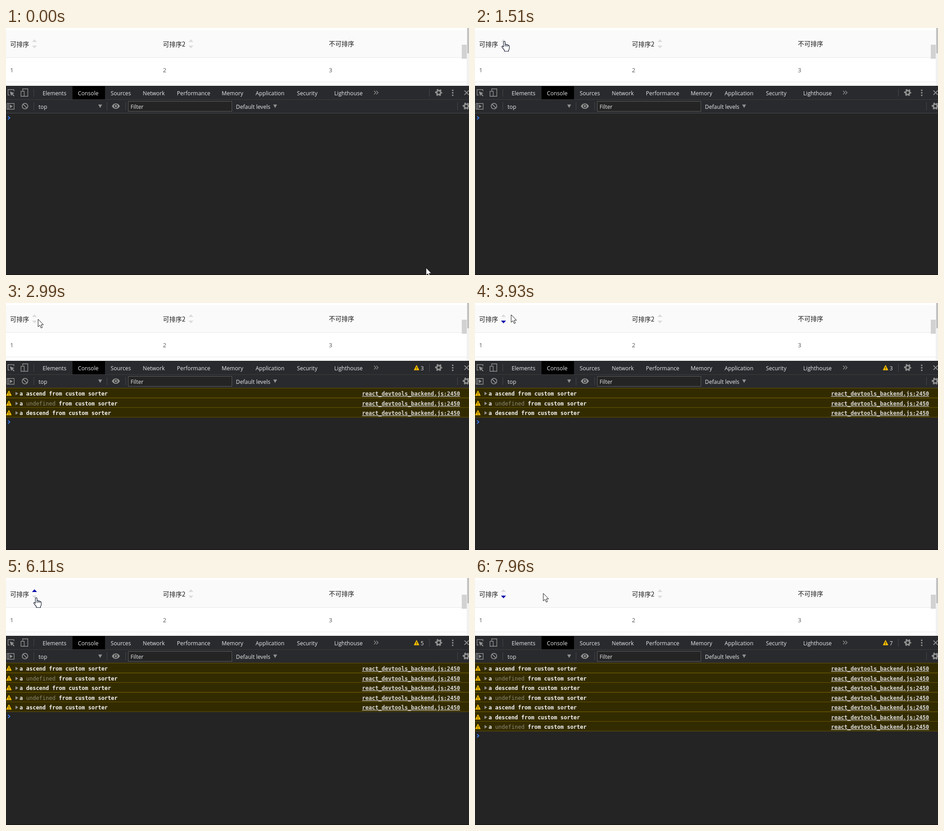
Recreate the animation shown at these times as an HTML page. Size 1024 by 547 pixels, loop 8000 ms.

```html
<!DOCTYPE html>
<html lang="zh">
<head>
<meta charset="utf-8">
<title>Sortable table with console</title>
<style>
html, body { margin: 0; width: 100%; height: 100%; overflow: hidden; background: #242424; }
svg { display: block; width: 100vw; height: 100vh; }
text { white-space: pre; }
.table { font: 14px "Noto Sans CJK SC", "Noto Sans CJK", sans-serif; fill: #1f1f1f; }
.cell { font: 13.2px "Open Sans", sans-serif; fill: #555; }
.ui { font: 12.2px "Open Sans", "Noto Sans", sans-serif; fill: #e8eaed; }
.log { font: bold 12px "DejaVu Sans Mono", monospace; fill: #f5f5f5; }
.link { text-decoration: underline; fill: #dcdcdc; }
.undef { font-weight: normal; fill: #8f8a78; }
.line { fill: none; stroke: #919191; stroke-width: 1.4; }
.solid { fill: #919191; }
</style>
</head>
<body>
<svg viewBox="0 0 1024 547" preserveAspectRatio="none">
  <defs>
    <g id="warning">
      <path d="M0-5.3L5.2 4.8H-5.2Z" fill="#f5bd00" stroke="#f5bd00" stroke-width="1.2" stroke-linejoin="round"/>
      <path d="M0-2V1.6M0 2.6V4" stroke="#3a3000" stroke-width="1.4"/>
    </g>
    <g id="gear">
      <circle r="4.4" fill="none" stroke="#919191" stroke-width="3.4"/>
      <circle r="6.5" fill="none" stroke="#919191" stroke-width="3" stroke-dasharray="3.4 3.407" stroke-dashoffset="1.7"/>
    </g>
  </defs>

  <rect width="1024" height="128" fill="#fff"/>
  <rect y="5" width="1019" height="61" fill="#fafafa"/>
  <rect id="hover" y="66" width="1019" height="53" fill="#fafafa"/>
  <path d="M0 65.5H1019M0 119.5H1019" stroke="#e8e8e8"/>
  <g class="table">
    <text x="9" y="40.5">可排序</text>
    <text x="347" y="40.5">可排序2</text>
    <text x="714" y="40">不可排序</text>
  </g>
  <g class="cell">
    <text x="9" y="98">1</text><text x="347" y="98">2</text><text x="714" y="98">3</text>
  </g>
  <path id="up" d="M63 25L68.5 31H57.5Z"/>
  <path id="down" d="M63 45L68.5 39H57.5Z"/>
  <path d="M409 25L414.5 31H403.5ZM409 45L414.5 39H403.5Z" fill="#dcdcdc"/>
  <rect x="1008" y="37" width="11" height="31" fill="#d2d2d2"/>
  <rect x="1019" width="5" height="128" fill="#f1f1f1"/>
  <rect x="1020" width="4" height="56" fill="#c1c1c1"/>

  <rect y="128" width="1024" height="419" fill="#242424"/>
  <rect y="128" width="1024" height="60" fill="#292a2d"/>
  <rect x="147" y="129" width="72" height="29" fill="#000"/>
  <path d="M0 158.5H1024" stroke="#3d3d3d"/>
  <path d="M0 188.5H1024" stroke="#494c50"/>
  <path d="M0 546.5H1024" stroke="#111"/>
  <path d="M61.5 135V152M936.5 135V152M61.5 164V182M223.5 164V182M264.5 164V182M998.5 164V182" stroke="#45484c"/>
  <g class="ui" id="tabs"></g>
  <g class="ui">
    <text x="72" y="178.5">top</text>
    <rect x="270.5" y="162.5" width="229" height="22" fill="#242424" stroke="#5c5c5c"/>
    <text x="275.5" y="178.5">Filter</text>
    <text x="508.5" y="178.5">Default levels</text>
  </g>
  <g class="line">
    <path d="M8 148.5H4.5V136.5H17.5V140"/>
    <path d="M37 139V134.7H48.3V151.3H41M33.2 140.2H40.3V151.3H33.2Z"/>
    <path d="M814 139L818 143L814 147M819 139L823 143L819 147"/>
    <path d="M1014 138.5L1023.5 148M1023.5 138.5L1014 148" stroke-width="1.8"/>
    <path d="M2.5 167.2H18V179.8H2.5ZM5.8 167V180"/>
    <circle cx="42" cy="173" r="6.2" stroke-width="1.8"/>
    <path d="M37.6 168.6L46.4 177.4" stroke-width="1.8"/>
  </g>
  <g class="solid">
    <path d="M8.5 140.5L18.5 144L14.8 146L18.8 150L17.3 151.5L13.3 147.5L11.5 150.5Z"/>
    <path d="M8.5 169.5L15 173.5L8.5 177.5Z"/>
    <path d="M204 169.5H212.5L208.2 177ZM591 169.5H599.5L595.2 177Z"/>
    <path d="M234 173Q237.5 167 243 167T252 173Q248.500 179 243 179T234 173Z"/>
    <circle cx="988" cy="138" r="1.8"/><circle cx="988" cy="143.500" r="1.8"/><circle cx="988" cy="149" r="1.8"/>
  </g>
  <circle cx="243" cy="173" r="3.2" fill="#919191" stroke="#292a2d" stroke-width="1.6"/>
  <use href="#gear" x="957" y="143"/>
  <use href="#gear" x="1018" y="173"/>
  <g id="badge" class="ui"><use href="#warning" x="908" y="143.5"/><text id="count" x="917" y="148.5"></text></g>

  <g id="rows"></g>
  <path id="prompt" d="M4.500 195.500L8.500 199L4.500 202.500" fill="none" stroke="#367cf1" stroke-width="1.9"/>

  <g id="cursor">
    <path id="arrow" d="M0 0V16.8L3.900 13.200L6.600 19.400L9.300 18.300L6.700 12.200H11.800Z" fill="#fff" stroke="#111"/>
    <g id="hand" fill="#fff" stroke="#111a2e" stroke-width="1.200" stroke-linejoin="round">
      <path d="M-2 13V2.200Q-2 .6-.2 .6T1.600 2.200V7.500Q1.800 6.600 3.200 6.800T4.800 8.400Q5.200 7.400 6.600 7.800T8 9.600Q8.600 8.800 9.800 9.300T11 11V15.500Q11 18 9.400 19.800V22.500H0V20L-4.800 14.200Q-6.200 12.200-5 11.400T-2.400 12.600Z"/>
      <path d="M1.600 7.500V12M4.800 8.400V12M8 9.600V12" fill="none"/>
    </g>
    <circle id="press" r="12" fill="#ff0" fill-opacity=".47"/>
  </g>
</svg>
<script>
const LOOP = 8000;
const ROW = 21.5;
const $ = id => document.getElementById(id);
const show = (el, on) => el.setAttribute('visibility', on ? 'visible' : 'hidden');

const tabs = {
  Elements: 81, Console: 159, Sources: 231.5, Network: 302.5, Performance: 378,
  Memory: 477, Application: 552, Security: 643.5, Lighthouse: 726
};
$('tabs').innerHTML = Object.entries(tabs)
  .map(([name, x]) => `<text x="${x}" y="148.5">${name}</text>`).join('');

// Each console line: time it is printed and the new sort order.
const logs = [
  [1590, 'ascend'], [2150, 'undefined'], [2990, 'descend'], [4700, 'undefined'],
  [5560, 'ascend'], [6570, 'descend'], [7960, 'undefined']
];
const ICON_DELAY = 75;

// Mouse presses: start and end.
const presses = [
  [1430, 1510], [1980, 2150], [2850, 2990], [4550, 4630],
  [5400, 5480], [6410, 6570], [7800, 7960]
];

// Pointer moves: first step, last step, number of steps, destination.
const moves = [
  [70, 210, 3, 75, 97],
  [360, 600, 4, 74, 18],
  [670, 900, 4, 66, 34],
  [1050, 1280, 4, 65, 29],
  [1590, 1830, 4, 118, 38],
  [2150, 2150, 1, 116, 42],
  [2230, 2610, 6, 64, 38],
  [2990, 3450, 7, 98, 28],
  [3930, 3930, 1, 80, 26],
  [3950, 4000, 2, 62, 26],
  [4240, 4380, 3, 122, 31],
  [4550, 4550, 1, 122, 28],
  [4700, 5010, 5, 64, 32],
  [5250, 5250, 1, 64, 31],
  [5560, 5700, 3, 72, 44],
  [5860, 5940, 2, 69, 45],
  [6110, 6110, 1, 67, 43],
  [7190, 7190, 1, 72, 42],
  [7340, 7720, 6, 151, 34]
];

const rows = logs.map(([, order], i) => {
  const row = document.createElementNS('http://www.w3.org/2000/svg', 'g');
  row.setAttribute('transform', `translate(0 ${Math.round(188 + i * ROW)})`);
  const style = order === 'undefined' ? ' class="undef"' : '';
  row.innerHTML = `
    <rect width="1024" height="22" fill="#332b00"/>
    <path d="M0 .5H1024M0 22H1024" stroke="#665500"/>
    <use href="#warning" x="6.5" y="12"/>
    <path d="M21 8.500L27 12.500L21 16.500Z" class="solid"/>
    <text class="log" x="30" y="17">a <tspan${style}>${order}</tspan> from custom sorter</text>
    <text class="log link" x="787.5" y="17">react_devtools_backend.js:2450</text>`;
  return $('rows').appendChild(row);
});

function pointerAt(t) {
  let x = 929, y = 531;
  for (const [start, end, steps, toX, toY] of moves) {
    if (t < start) break;
    const gap = (end - start) / Math.max(1, steps - 1);
    const step = t >= end ? steps : 1 + Math.floor((t - start) / gap);
    const rest = 1 - step / steps;
    const done = 1 - rest ** 1.5;
    x += (toX - x) * done;
    y += (toY - y) * done;
  }
  return [x, y];
}

function render(t) {
  const printed = logs.filter(([time]) => t >= time).length;
  rows.forEach((row, i) => show(row, i < printed));
  $('prompt').setAttribute('transform', `translate(0 ${printed * ROW})`);
  show($('badge'), printed > 0);
  $('count').textContent = printed;

  const [, order] = logs.filter(([time]) => t >= time + ICON_DELAY).pop() || [];
  $('up').setAttribute('fill', order === 'ascend' ? '#0000a8' : '#dcdcdc');
  $('down').setAttribute('fill', order === 'descend' ? '#0000a8' : '#dcdcdc');

  const [x, y] = pointerAt(t);
  const overIcon = x > 56 && x < 68.5 && y > 24 && y < 46;
  $('cursor').setAttribute('transform', `translate(${x} ${y})`);
  show($('hand'), overIcon);
  show($('arrow'), !overIcon);
  show($('press'), presses.some(([start, end]) => t >= start && t < end));
  show($('hover'), t >= 360 && y > 66 && y < 119);
}

const began = performance.now();
function tick() {
  render((performance.now() - began) % LOOP);
  requestAnimationFrame(tick);
}
tick();
</script>
</body>
</html>
```
